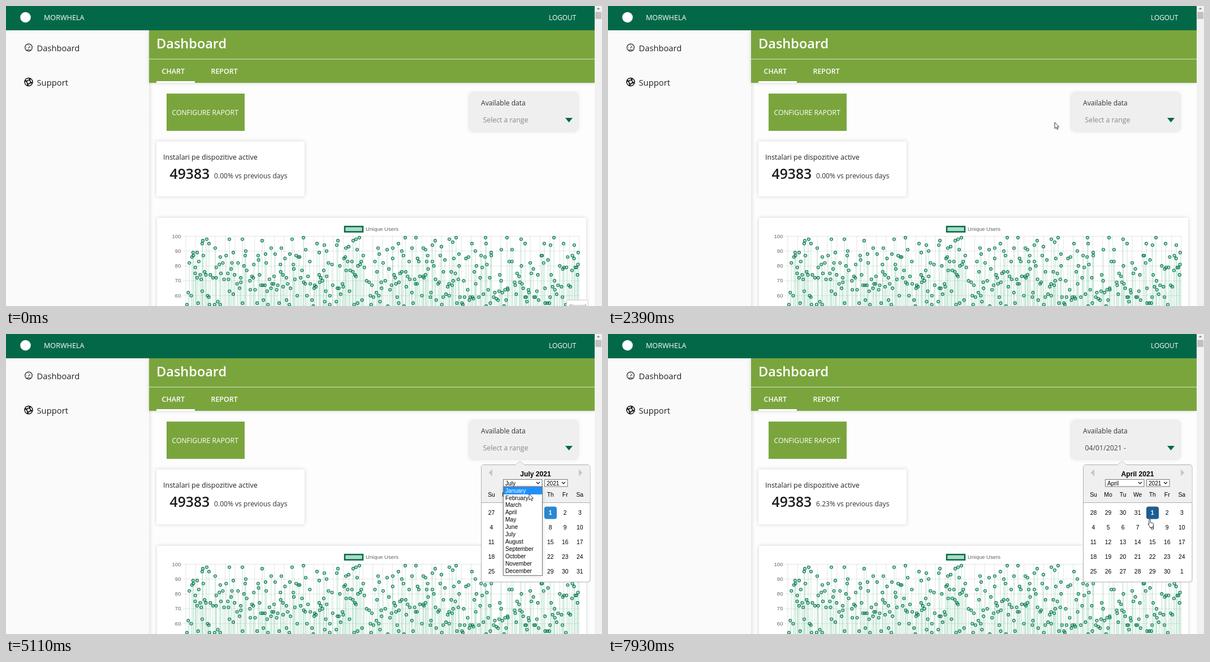
An HTML page that plays this animation: 1054 by 531 pixels, repeating every 8000 ms.

```html
<!DOCTYPE html>
<html lang="en">
<head>
<meta charset="utf-8">
<title>Dashboard</title>
<style>
  html, body { margin: 0; width: 100%; height: 100%; overflow: hidden; background: #fdfdfd; }
  svg { display: block; width: 100vw; height: 100vh; cursor: default; }
  text { font-family: "Open Sans", "Noto Sans", sans-serif; white-space: pre; }
  .ui text { font-family: "Liberation Sans", Arial, sans-serif; }
  .mid text { text-anchor: middle; }
  .soft { filter: drop-shadow(0 0 3px rgba(0, 0, 0, .17)); }
</style>
</head>
<body>
<svg id="stage" viewBox="0 0 1054 531" preserveAspectRatio="none"></svg>
<script>
const GREEN = '#036848', LIME = '#7aa53d';
const MONTHS = ['January', 'February', 'March', 'April', 'May', 'June', 'July',
  'August', 'September', 'October', 'November', 'December'];
const range = n => [...Array(n).keys()];

const rect = (x, y, w, h, fill, more = '') =>
  `<rect x="${x}" y="${y}" width="${w}" height="${h}" fill="${fill}" ${more}/>`;
const text = (x, y, size, str, fill = '#222', more = '') =>
  `<text x="${x}" y="${y}" font-size="${size}" fill="${fill}" ${more}>${str}</text>`;
const path = (d, more) => `<path d="${d}" ${more}/>`;
const group = (body, more = '') => `<g ${more}>${body}</g>`;

// ---- chart: the highest points as x, value pairs; the rest is seeded noise
const PEAKS = [
  331, 89, 338, 89, 347, 95, 348, 97, 355, 98, 359, 95, 370, 92, 379, 86, 395, 98, 402, 89,
  418, 98, 424, 90, 446, 87, 453, 97, 459, 88, 469, 92, 476, 88, 487, 92, 502, 88, 506, 98,
  526, 99, 530, 91, 550, 95, 554, 89, 563, 94, 567, 90, 585, 94, 587, 97, 601, 92, 606, 93,
  614, 97, 619, 98, 625, 99, 621, 91, 658, 92, 660, 88, 674, 91, 684, 92, 694, 95, 700, 90,
  706, 99, 718, 92, 725, 99, 738, 92, 742, 91, 754, 94, 759, 97, 770, 93, 784, 98, 790, 96,
  796, 99, 801, 88, 824, 95, 830, 90, 848, 99, 849, 95, 858, 89, 876, 91, 886, 99, 895, 91,
  911, 98, 918, 95, 952, 95, 963, 94, 969, 99, 986, 95, 1005, 94, 1012, 89
];
const valueY = v => 407.5 + (100 - v) * 2.63;

function chart() {
  let seed = 77;
  const rnd = () => (seed = seed * 16807 % 2147483647) / 2147483647;
  const points = range(PEAKS.length / 2).map(i => [PEAKS[2 * i], PEAKS[2 * i + 1]]);
  for (const i of range(335)) points.push([320 + (i + rnd()) * 2.07, 50 + Math.floor(rnd() * 38)]);
  let dots = '', stems = '', grid = '';
  for (const [x, v] of points) {
    const y = valueY(v);
    dots += `M${(x - 2.5).toFixed(1)} ${y.toFixed(1)}a2.5 2.5 0 1 0 5 0a2.5 2.5 0 1 0-5 0z`;
    stems += `M${x.toFixed(1)} ${y.toFixed(1)}L${(x + rnd() - .5).toFixed(1)} 540`;
  }
  for (const i of range(41)) grid += `M${318 + i * 17.4} 407V531`;
  for (const i of range(5)) grid += `M313 ${valueY(100 - i * 10)}H1014`;
  return group(rect(267, 375, 759, 180, '#fff'), 'class="soft"') +
    path(grid, 'stroke="#000" stroke-opacity=".1" fill="none"') +
    path(stems, 'stroke="#4fbb80" stroke-opacity=".42" stroke-width=".8" fill="none"') +
    path(dots, 'fill="#a9dcc4" stroke="#0b7652" stroke-width="1.1"') +
    group(range(5).map(i => text(309.5, valueY(100 - i * 10) + 3, 9.6, 100 - i * 10, '#666',
      'text-anchor="end"')).join('') +
      rect(599, 390.3, 32, 9.4, '#abdcc5', `stroke="${GREEN}" stroke-width="2.5"`) +
      text(636, 398, 9.6, 'Unique Users', '#666'), 'class="ui"');
}

// ---- page
const page =
  rect(0, 0, 1054, 531, '#fdfdfd') +
  rect(0, 43, 253, 488, '#fafafa') +
  rect(30, 57, 170, 35, '#f9faf9') + rect(30, 118, 170, 35, '#f9faf9') +
  rect(253, 43, 7, 488, 'url(#edge)') +
  rect(253, 43, 788, 93, LIME, 'class="soft"') +
  rect(0, 0, 1041, 43, GREEN) +
  '<circle cx="34.5" cy="20" r="9.3" fill="#fff"/>' +
  text(67, 25, 12.6, 'MORWHELA', '#fff') + text(960, 25, 11.9, 'LOGOUT', '#fff') +
  group('<circle cx="40" cy="73.5" r="6.4"/>' + path('M39.5 75l3-4M36 74h1M40 69.5v1M43.5 74h1M36 78.5q4-2 8 0', ''),
    'fill="none" stroke="#222" stroke-width="1.2"') +
  group('<circle cx="40" cy="134.5" r="7"/><circle cx="40" cy="134.5" r="3.2"/>' +
    '<circle cx="40" cy="134.5" r="5" stroke-width="3" stroke-dasharray="2.6 5.25"/>',
    'fill="none" stroke="#111" stroke-width="1.5"') +
  text(54.5, 80, 14.7, 'Dashboard') + text(54.5, 141, 14.8, 'Support') +
  text(266, 75, 23.5, 'Dashboard', '#fff', 'font-weight="600"') +
  rect(253, 93.5, 788, 1, '#dce8cb') +
  text(275.5, 120, 12.5, 'CHART', '#fff', 'font-weight="600"') +
  text(362.5, 120, 12.4, 'REPORT', '#fff', 'font-weight="600"') +
  rect(266, 133, 68, 3, '#fff') +
  rect(284, 155, 138, 66, LIME, 'id="button"') +
  text(293.5, 193, 12.2, 'CONFIGURE RAPORT', '#fff') +
  group(rect(820, 154, 191, 67, '#efefef', 'rx="5"'), 'class="soft"') +
  text(840, 176, 12.1, 'Available data', '#333') +
  text(843.5, 206, 12.3, '', '#868686', 'id="input"') +
  rect(844, 193, 1, 17, '#333', 'id="caret"') +
  path('M989 198h13l-6.5 8z', `fill="${GREEN}"`) +
  group(rect(266, 239.5, 262, 97.5, '#fff'), 'class="soft"') +
  text(278, 272, 12.5, 'Instalari pe dispozitive active', '#222', 'font-weight="500"') +
  text(289.5, 306, 24.8, '49383', '#1c1c1c', 'font-weight="600"') +
  text(368, 304.5, 12.1, '', '#333', 'id="change"') +
  chart() +
  group(rect(991.5, 520.5, 38, 20, '#fff', 'stroke="#ccc" rx="1"') +
    text(996, 534, 9.5, 'Record', '#999'), 'id="hint" class="ui"') +
  rect(1041, 0, 13, 531, '#f1f1f1') + rect(1042, 10.5, 11, 12.5, '#c1c1c1') +
  path('M1044.5 6h6l-3-3.2z', 'fill="#8a8a8a"');

// ---- date picker
const colX = c => 858.5 + c * 26.05, rowY = r => 316.5 + r * 26;
const chevron = x => path(`M${x} 262l3 3 3-3`, 'fill="none" stroke="#222" stroke-width="1.4"');
const picker = group(
  rect(840.5, 231.5, 192.5, 207.5, '#fff', 'rx="4" stroke="#aeaeae"') +
  path('M841 298V235.5q0-3.5 3.5-3.5h184.5q3.5 0 3.5 3.5V298z', 'fill="#f0f0f0"') +
  path('M841 298.5h192', 'stroke="#aeaeae"') +
  path('M900.5 232l8.5-7 8.5 7', 'fill="#f0f0f0" stroke="#bbb" stroke-width=".8"') +
  path('M860 239.5v12l-6.5-6zM1013 239.5v12l6.5-6z', 'fill="#c6c6c6"') +
  rect(879.5, 257.5, 68.5, 12.5, '#fff', 'id="select"') +
  rect(952.5, 257.5, 40.5, 12.5, '#fff', 'stroke="#767676"') +
  text(883, 267.5, 10.2, '', '#000', 'id="month"') + text(956, 267.5, 10.1, '2021', '#000') +
  chevron(938) + chevron(983) +
  group(text(936.5, 251.5, 12.1, '', '#000', 'id="title" font-weight="700"') +
    ['Su', 'Mo', 'Tu', 'We', 'Th', 'Fr', 'Sa'].map((d, c) => text(colX(c), 288, 10.4, d, '#000')).join('') +
    rect(0, 0, 22, 22, '#f0f0f0', 'id="hover" rx="4"') +
    rect(952, 305.5, 22, 22, '', 'id="chosen" rx="4"') +
    range(35).map(i => text(colX(i % 7), rowY(i / 7 | 0) + 3.7, 10.4, '', i == 4 ? '#fff' : '#000',
      `class="day" ${i == 4 ? 'font-weight="700"' : ''}`)).join(''), 'class="mid"') +
  group(rect(879.5, 270.5, 69, 157, '#fff', 'stroke="#767676" class="soft"') +
    rect(880, 0, 68, 13, '#1e90ff', 'id="mark"') +
    MONTHS.map((m, i) => text(883, 280.6 + i * 12.93, 10.2, m, '#000', 'class="option"')).join(''),
    'id="list"'), 'id="picker" class="ui"');

const pointers = group(
  path('M0 0V11L2.6 8.6 4.3 12.4 6 11.7 4.4 8H7.6Z', 'id="arrow"') +
  path('M0 0q1.2 0 1.2 1.2v4.6l4.2 1q1.5.5 1.3 2l-.8 3.4v2.3H.3v-1.4l-3.2-4.4q-.4-1.6 1.4-1L-1.2 8.6V1.2Q-1.2 0 0 0z',
    'id="hand"') +
  path('M-2.5-7Q0-7 0-6Q0-7 2.5-7M0-6V7M-2.5 8Q0 8 0 7Q0 8 2.5 8', 'id="beam" style="fill:none"'),
  'id="pointer" fill="#fff" stroke="#222" stroke-width=".9"');

const stage = document.getElementById('stage');
stage.innerHTML = `<defs><linearGradient id="edge"><stop stop-color="#e9e9e9"/>
  <stop offset="1" stop-color="#fdfdfd"/></linearGradient></defs>` + page + picker + pointers;

const el = id => document.getElementById(id);
const show = (id, on) => el(id).style.display = on ? '' : 'none';
const set = (id, attrs) => { for (const k in attrs) el(id).setAttribute(k, attrs[k]); };
const days = [...document.querySelectorAll('.day')];
const options = [...document.querySelectorAll('.option')];

// Pointer legs: start, step count, then the places it passes; each place is held.
const LEGS = [
  [490, [1022, 517], [800, 330], [588, 184]],
  [890, [690, 181], [817, 206]],
  [1280, [850, 193], [880, 186]],
  [1580, [720, 227], [560, 222], [469, 216]],
  [1990, [412, 210], [408, 208], [450, 217], [620, 211], [790, 206]],
  [2590, [830, 205], [870, 203], [890, 202]],
  [3290, [893, 205], [897, 211], [903, 230], [910, 250], [918, 278], [924, 309], [924, 305]],
  [4110, [926, 300], [932, 288], [940, 275], [944, 266], [942, 263], [938, 262]],
  [4810, [932, 263], [927, 265], [926, 274], [925, 283], [924, 291], [922, 303], [920, 316], [918, 329]],
  [5830, [917, 327], [916, 320], [916, 316]],
  [6430, [916, 316], [920, 322], [930, 330], [942, 336], [952, 340], [960, 345], [961, 356], [961, 403]],
  [7320, [961, 365], [960, 342], [958, 328]]
];
const TRACK = LEGS.flatMap(([t, ...places]) => places.map((p, i) => [t + i * 100, ...p]));

function draw(t) {
  const spot = TRACK.findLast(p => p[0] <= t);
  const [, x, y] = spot || [0, -50, -50];
  const open = t >= 2900, listed = t >= 4710 && t < 6430, april = t >= 6430, picked = t >= 7830;
  const name = april ? 'April' : 'July';

  el('hint').style.opacity = t < 100 ? 1 : t < 200 ? .6 : t < 270 ? .3 : 0;
  const onButton = x > 284 && x < 422 && y > 155 && y < 221;
  set('button', { fill: onButton ? '#6b9433' : LIME });
  el('input').textContent = picked ? '04/01/2021 -' : 'Select a range';
  set('input', { fill: picked ? '#444' : '#868686' });
  el('change').textContent = (picked ? '6.23' : '0.00') + '% vs previous days';
  show('caret', t >= 3000 && t < 3500 || t >= 4010 && t < 4520);

  show('picker', open);
  el('title').textContent = name + ' 2021';
  el('month').textContent = name;
  const focus = april && !picked;
  set('select', { stroke: focus ? '#101010' : '#767676', 'stroke-width': focus ? 1.8 : 1, rx: focus ? 1.5 : 0 });
  const before = april ? 31 : 30, length = april ? 30 : 31, first = before - 3;
  days.forEach((d, i) => {
    const n = i - 3;
    d.textContent = n < 1 ? first + i : n > length ? n - length : n;
  });

  const col = Math.floor((x - 847.5) / 26.05), row = Math.floor((y - 305) / 26);
  const over = april && col >= 0 && row >= 0;
  show('hover', over);
  set('hover', { x: colX(col) - 11, y: rowY(row) - 11 });
  set('chosen', { fill: over && col == 4 && row == 0 ? '#1d5d90' : '#2a87d0' });

  show('list', listed);
  const lit = t < 5010 ? 6 : Math.max(0, Math.floor((y - 270.9) / 12.93));
  set('mark', { y: 270.9 + lit * 12.93 });
  options.forEach((o, i) => o.setAttribute('fill', i == lit ? '#fff' : '#000'));

  const hand = onButton || over, beam = x > 842 && x < 986 && y > 194 && y < 213;
  show('hand', hand);
  show('beam', beam);
  show('arrow', !hand && !beam);
  set('pointer', { transform: `translate(${x} ${y})` });
}

function frame() {
  draw(performance.now() % 8000);
  requestAnimationFrame(frame);
}
frame();
</script>
</body>
</html>
```
